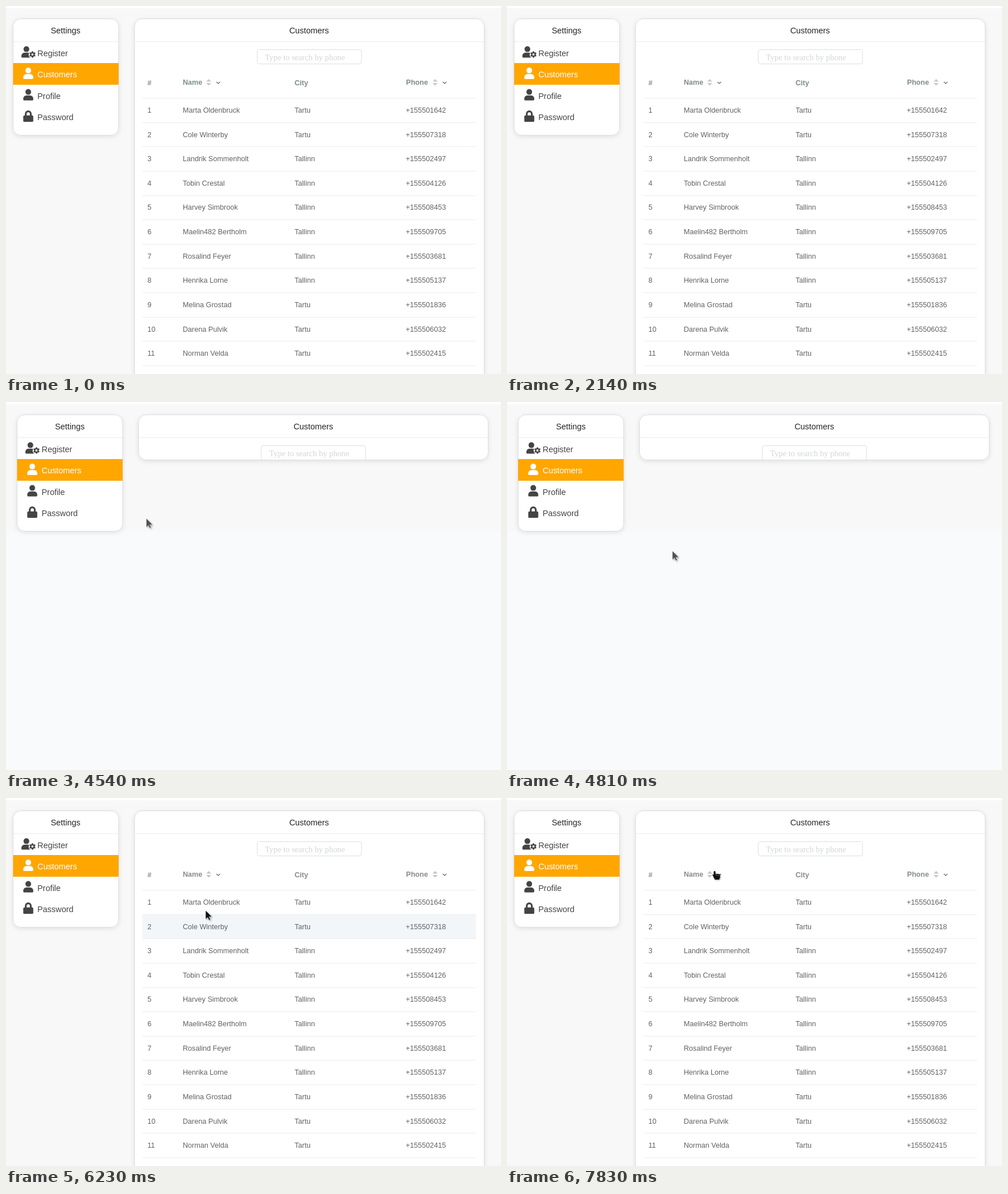
These frames come from a looping animation (868 px wide and 645 px high, 8 s). An HTML page with a canvas:

```html
<!DOCTYPE html>
<html lang="en">
<head>
<meta charset="utf-8">
<title>Customers</title>
<style>
html, body { margin: 0; width: 100%; height: 100%; overflow: hidden; background: #f8fafc; }
canvas { display: block; }
</style>
</head>
<body>
<canvas id="stage" width="868" height="645"></canvas>
<script>
const ctx = document.getElementById('stage').getContext('2d');
const W = 868, H = 645, LOOP = 8000, STEP = 68;
const SANS = '"Liberation Sans", Arial, sans-serif';
const SERIF = '"Liberation Serif", "Times New Roman", serif';
const ROW_TOP = 161, ROW_H = 42.64;

const customers = [
  ['Marta Oldenbruck', 'Tartu', '+155501642'],
  ['Cole Winterby', 'Tartu', '+155507318'],
  ['Landrik Sommenholt', 'Tallinn', '+155502497'],
  ['Tobin Crestal', 'Tallinn', '+155504126'],
  ['Harvey Simbrook', 'Tallinn', '+155508453'],
  ['Maelin482 Bertholm', 'Tallinn', '+155509705'],
  ['Rosalind Feyer', 'Tallinn', '+155503681'],
  ['Henrika Lorne', 'Tallinn', '+155505137'],
  ['Melina Grostad', 'Tartu', '+155501836'],
  ['Darena Pulvik', 'Tartu', '+155506032'],
  ['Norman Velda', 'Tartu', '+155502415']
];

// row, hover start, hover end
const hovers = [[0, 1330, 1500], [2, 5420, 5950], [1, 5950, 6232], [0, 6290, 6620]];

// Pointer strokes; each key is [time, x, y]
const strokes = [
  { color: '#554540', until: 1470, keys: [[650, 836, 612], [718, 788, 498], [786, 770, 456], [1126, 560, 290], [1262, 446, 188]] },
  { color: '#554540', until: 2140, keys: [[1470, 422, 181], [1674, 285, 138], [1878, 180, 72], [2082, 102, 2]] },
  { color: '#505050', until: 5420, keys: [[4060, 112, 4], [4264, 160, 78], [4536, 246, 204], [4808, 290, 261]] },
  { color: '#111', until: 5810, keys: [[5420, 290, 261]] },
  { color: '#111', until: 6620, keys: [[5810, 294, 257], [6218, 350, 197], [6558, 353, 163]] },
  { color: '#111', until: 7690, keys: [[6620, 350, 141]] },
  { hand: true, until: 8000, keys: [[7690, 356, 137], [7758, 358, 132], [7826, 360, 128]] }
];

const clamp = v => Math.max(0, Math.min(1, v));
let nudge = 0;

function rect(x, y, w, h, color) {
  ctx.fillStyle = color;
  ctx.fillRect(x, y, w, h);
}

function text(s, x, y, color, font, align = 'left') {
  ctx.font = font;
  ctx.textAlign = align;
  ctx.fillStyle = color;
  ctx.fillText(s, x + nudge, y);
}

function poly(points, color) {
  ctx.beginPath();
  points.forEach(([x, y]) => ctx.lineTo(x, y));
  ctx.closePath();
  ctx.fillStyle = color;
  ctx.fill();
}

function box(x, y, w, h, r, border) {
  ctx.beginPath();
  ctx.roundRect(x + 0.5, y + 0.5, w - 1, h - 1, r);
  ctx.fillStyle = '#fff';
  ctx.fill();
  ctx.strokeStyle = border;
  ctx.lineWidth = 1;
  ctx.stroke();
}

function card(x, w, h, title) {
  ctx.save();
  ctx.shadowColor = 'rgba(0,0,0,.1)';
  ctx.shadowBlur = 9;
  ctx.shadowOffsetY = 2;
  ctx.beginPath();
  ctx.roundRect(x, 22, w, h, 14);
  ctx.fillStyle = '#fff';
  ctx.fill();
  ctx.restore();
  box(x, 22, w, h, 13.5, '#dcdddf');
  rect(x + 1, 62, w - 2, 1, '#ebecef');
  text(title, x + w / 2 - 0.5, 48, '#212529', '14.4px ' + SANS, 'center');
}

// Icons are drawn on a 512-unit grid, 20px high
function icon(x, y, color, draw) {
  ctx.save();
  ctx.translate(x, y);
  ctx.scale(20 / 512, 20 / 512);
  ctx.fillStyle = ctx.strokeStyle = color;
  draw();
  ctx.restore();
}

function disc(x, y, r, color) {
  ctx.beginPath();
  ctx.arc(x, y, r, 0, 7);
  if (color) ctx.fillStyle = color;
  ctx.fill();
}

function block(x, y, w, h, r) {
  ctx.beginPath();
  ctx.roundRect(x, y, w, h, r);
  ctx.fill();
}

function person() {
  disc(224, 128, 128);
  block(0, 288, 448, 224, [134, 134, 48, 48]);
}

function personGear() {
  person();
  const dark = ctx.fillStyle;
  disc(496, 368, 172, '#fff');
  disc(496, 368, 108, dark);
  ctx.lineWidth = 66;
  for (let i = 0; i < 3; i++) {
    const a = Math.PI * (i / 3 + 0.5), dx = 142 * Math.cos(a), dy = 142 * Math.sin(a);
    ctx.beginPath();
    ctx.moveTo(496 - dx, 368 - dy);
    ctx.lineTo(496 + dx, 368 + dy);
    ctx.stroke();
  }
  disc(496, 368, 48, '#fff');
}

function lock() {
  block(0, 224, 448, 288, 48);
  ctx.lineWidth = 80;
  ctx.beginPath();
  ctx.moveTo(112, 240);
  ctx.lineTo(112, 152);
  ctx.arc(224, 152, 112, Math.PI, 0);
  ctx.lineTo(336, 240);
  ctx.stroke();
}

const menu = [
  ['Register', 27, personGear],
  ['Customers', 30.3, person],
  ['Profile', 30.3, person],
  ['Password', 30.3, lock]
];

function drawMenu() {
  card(12, 186, 205, 'Settings');
  rect(12.5, 100, 185, 38, '#ffa600');
  menu.forEach(([label, x, draw], i) => {
    const color = i === 1 ? '#fff' : '#444';
    icon(x, 70.6 + i * 37.5, color, draw);
    text(label, 55, Math.round(87.7 + i * 37.4), color, '14.4px ' + SANS);
  });
}

function drawPanel(height) {
  card(225, 614, height, 'Customers');
  box(440, 76, 184, 26, 3.6, '#dcdfe3');
  text('Type to search by phone', 454, 94.5, '#d2d5d8', '14.4px ' + SERIF);
}

function sorter(x, color) {
  poly([[x - 4.5, 132.5], [x, 128], [x + 4.5, 132.5]], color);
  poly([[x - 4.5, 135], [x, 139.5], [x + 4.5, 135]], color);
  ctx.beginPath();
  ctx.moveTo(x + 13.5, 133);
  ctx.lineTo(x + 16.7, 136);
  ctx.lineTo(x + 19.9, 133);
  ctx.strokeStyle = '#606266';
  ctx.lineWidth = 1.1;
  ctx.stroke();
}

function drawTable(t) {
  const early = t < 3340;
  const head = early ? '#7f8c8d' : '#878c90';
  const bold = 'bold 12.6px ' + SANS, plain = '12.6px ' + SANS;
  const lineY = i => Math.round(ROW_TOP + i * ROW_H);

  for (const [row, start, end] of hovers) {
    const y = lineY(row) + 1;
    ctx.globalAlpha = clamp((t - start) / 180) * (1 - clamp((t - end) / 180));
    rect(239, y, 585, lineY(row + 1) - y, early ? '#f8f9f9' : '#f3f6f9');
    ctx.globalAlpha = 1;
  }

  text('#', 248, 138.5, head, bold);
  text('Name', 310, 138, head, bold);
  text('City', 506, 138.5, head, bold);
  text('Phone', 701.5, 138, head, bold);
  const caret = early ? '#cfc6c5' : '#c0c6cb';
  sorter(355.5, caret);
  sorter(752.5, caret);

  for (let i = 0; i <= customers.length; i++) rect(239, lineY(i), 585, 1, '#ebecef');
  customers.forEach(([name, city, phone], i) => {
    const y = Math.round(186.9 + i * ROW_H);
    text(String(i + 1), 248, y, '#606266', plain);
    text(name, 310, y, '#606266', plain);
    text(city, 506, y, '#606266', plain);
    text(phone, 701, y, '#606266', plain);
  });
}

function arrow(color) {
  ctx.save();
  ctx.shadowColor = 'rgba(0,0,0,.4)';
  ctx.shadowBlur = 3;
  ctx.shadowOffsetX = ctx.shadowOffsetY = 1.5;
  const shape = [[0, 0], [0, 15.5], [3.6, 12.2], [6, 17.3], [8.4, 16.2], [6.1, 11.2], [11, 11]];
  poly(shape, color);
  ctx.restore();
  ctx.lineWidth = 0.7;
  ctx.strokeStyle = 'rgba(255,255,255,.75)';
  ctx.stroke();
}

function hand() {
  ctx.save();
  ctx.shadowColor = 'rgba(0,0,0,.35)';
  ctx.shadowBlur = 3;
  ctx.shadowOffsetX = ctx.shadowOffsetY = 1;
  ctx.fillStyle = '#111';
  block(2.5, 0, 3, 10, 1.5);
  block(2.5, 5, 11, 8, 2);
  block(4, 11, 8.5, 4, 1);
  poly([[0, 6.5], [1.5, 6], [4, 8.5], [5, 13], [3.5, 12]], '#111');
  ctx.restore();
  for (const x of [6, 8.6, 11.2]) rect(x, 5.5, 0.6, 3, '#aaa');
}

function drawPointer(t) {
  const stroke = strokes.find(s => t >= s.keys[0][0] && t < s.until);
  if (!stroke) return;
  const keys = stroke.keys, start = keys[0][0];
  const time = start + Math.floor((t - start + 1) / STEP) * STEP;
  let [, x, y] = keys[keys.length - 1];
  const next = keys.findIndex(k => k[0] > time);
  if (next > 0) {
    const [t0, x0, y0] = keys[next - 1], [t1, x1, y1] = keys[next];
    const p = (time - t0) / (t1 - t0);
    x = x0 + (x1 - x0) * p;
    y = y0 + (y1 - y0) * p;
  }
  ctx.save();
  ctx.translate(Math.round(x), Math.round(y));
  if (stroke.hand) hand();
  else arrow(stroke.color);
  ctx.restore();
}

function render(t) {
  rect(0, 0, W, H, '#f8fafc');
  if (t >= 3340 && t < 4060) return;
  const loading = t >= 4060 && t < 5420;
  rect(0, 0, W, loading ? 227 : H, '#f8f8f8');
  rect(0, 0, W, 4, '#fff');

  ctx.save();
  if (loading) {
    ctx.translate(7, 0);
    nudge = 0.5;
  }
  drawMenu();
  drawPanel(loading ? 80 : 700);
  nudge = 0;
  if (!loading) drawTable(t);
  ctx.restore();
  drawPointer(t);
}

function tick() {
  render(performance.now() % LOOP);
  requestAnimationFrame(tick);
}
tick();
</script>
</body>
</html>
```
